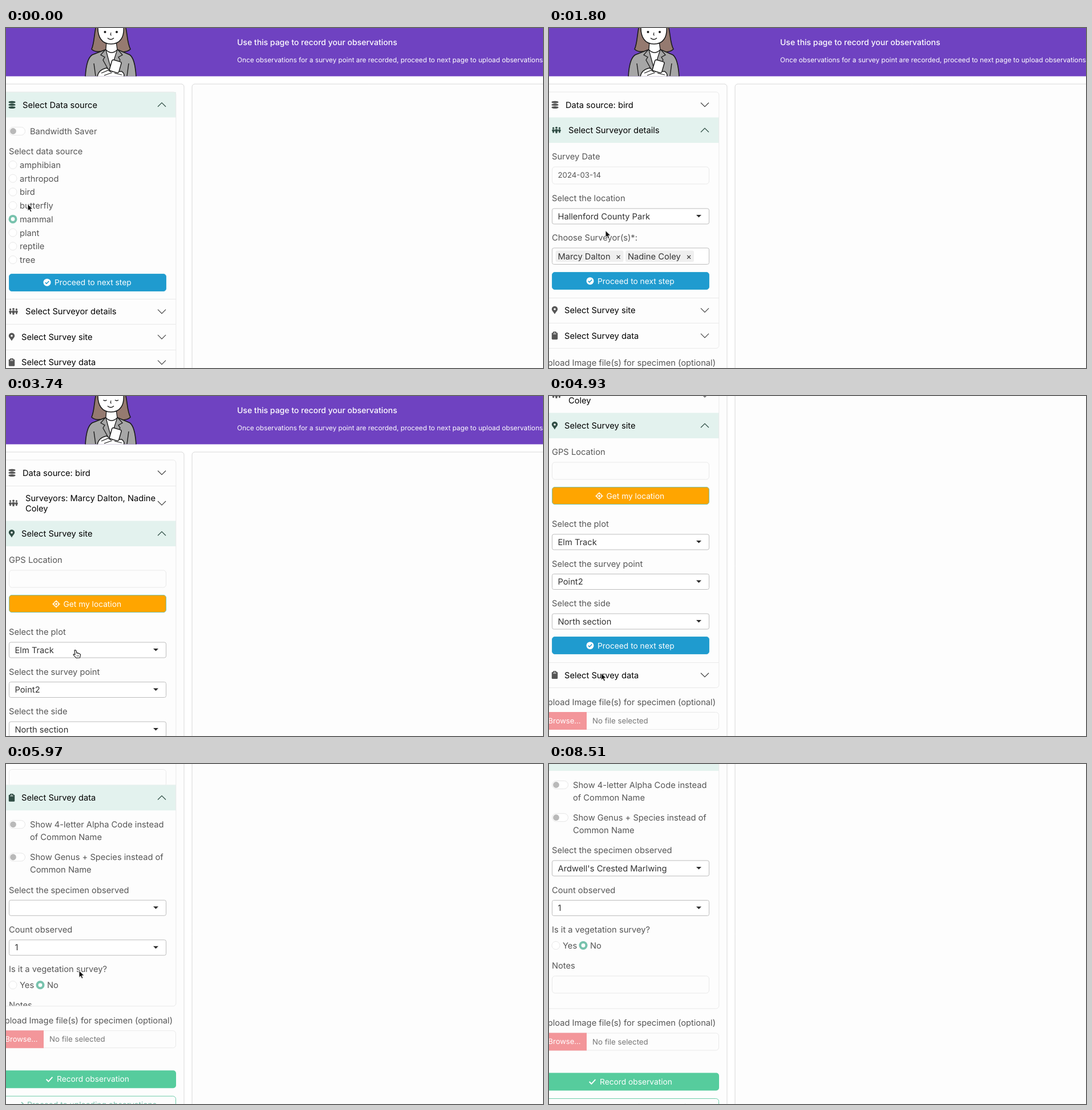
Recreate the animation shown at these times as an HTML page with a canvas. Size 941 px wide and 595 px high, loop 8.53 s.

```html
<!DOCTYPE html>
<html lang="en">
<head>
<meta charset="utf-8">
<title>Record observations</title>
<style>
html, body { margin: 0; width: 100%; height: 100%; overflow: hidden; background: #fff; }
canvas { display: block; width: 941px; height: 595px; }
</style>
</head>
<body>
<canvas id="stage"></canvas>
<script>
const W = 941, H = 595, LOOP = 8530;
const canvas = document.getElementById('stage');
const c = canvas.getContext('2d');
const dpr = window.devicePixelRatio || 1;
canvas.width = W * dpr;
canvas.height = H * dpr;
c.textRendering = 'geometricPrecision';

const SANS = 'Inter, "Open Sans", sans-serif';
const BODY = 14.7, SMALL = 13.25, BTN = 13.75;
const INK = '#565656', DARK = '#000', GREEN = '#78c2ad', DEEP = '#304e45';
const FAINT = '#e9e9e9', PAPER = '#fdfdfd', OPEN = '#e3f2ee';
const SURVEYORS = ['Marcy Dalton', 'Nadine Coley'];
const BIRD = "Ardwell's Crested Marlwing";
const KINDS = ['amphibian', 'arthropod', 'bird', 'butterfly', 'mammal', 'plant', 'reptile', 'tree'];
const LIST = ['American Robin', 'American Wigeon', BIRD, 'Band-tailed Pigeon', 'Barn Owl', 'Barn Swallow'];

// ---------- timing ----------
const tickAt = t => t < 3600 ? Math.floor(t / 150) : 24 + Math.floor((t - 3579) / 149.2);
const unit = v => Math.max(0, Math.min(1, v));
const smooth = v => v * v * (3 - 2 * v);
const slide = (k, start) => 1 - Math.pow(1 - unit((k - start) / 2.3), 2.5);
const fade = (k, start) => k < start ? 0 : k === start ? .5 : 1;

function along(keys, k) {
  let i = 0;
  while (i < keys.length - 2 && k >= keys[i + 1][0]) i++;
  const a = keys[i], b = keys[i + 1];
  const f = smooth(unit((k - a[0]) / (b[0] - a[0])));
  return a.slice(1).map((v, j) => v + (b[j + 1] - v) * f);
}

const SCROLL = [[28, 0], [33, 189], [34, 189], [37, 295.5]];
const POINTER = [
  [0, 38, 308], [3, 13, 285], [4, 13, 285], [7, 68, 419], [8, 80, 443], [10, 80, 443],
  [14, 118, 266], [15, 118, 268], [19, 116.5, 450], [21, 116.5, 450], [25, 121, 445],
  [28, 440, 360], [30, 440, 360], [33, 91.5, 485], [37, 128, 361.5], [40, 128, 361.5],
  [43, 150, 180], [44, 150, 180], [49, 152, 276], [51, 152, 276]
];

// ---------- drawing helpers ----------
function text(s, x, y, size = BODY, color = INK, weight = 400, align = 'left') {
  c.font = weight + ' ' + size + 'px ' + SANS;
  c.textAlign = align;
  c.fillStyle = color;
  c.fillText(s, x, y + size * .364);
}

function box(x, y, w, h, r, fill, line, lw = 1) {
  c.beginPath();
  c.roundRect(x, y, w, h, r);
  if (fill) { c.fillStyle = fill; c.fill(); }
  if (line) { c.strokeStyle = line; c.lineWidth = lw; c.stroke(); }
}

function dot(x, y, r, fill, line, lw = 1) {
  c.beginPath();
  c.arc(x, y, r, 0, 7);
  if (fill) { c.fillStyle = fill; c.fill(); }
  if (line) { c.strokeStyle = line; c.lineWidth = lw; c.stroke(); }
}

function poly(pts, line, lw, fill) {
  c.beginPath();
  for (let i = 0; i < pts.length; i += 2) c.lineTo(pts[i], pts[i + 1]);
  if (fill) { c.closePath(); c.fillStyle = fill; c.fill(); }
  if (line) { c.strokeStyle = line; c.lineWidth = lw; c.stroke(); }
}

function shape(d, fill, line, lw = 1.6) {
  const p = new Path2D(d);
  if (fill) { c.fillStyle = fill; c.fill(p); }
  if (line) { c.strokeStyle = line; c.lineWidth = lw; c.stroke(p); }
}

function blend(a, b, f) {
  return 'rgb(' + a.map((v, i) => Math.round(v + (b[i] - v) * f)).join(',') + ')';
}

// ---------- form parts ----------
function tick(x, y, s, color, lw) {
  poly([x - s, y, x - s * .3, y + s * .7, x + s, y - s * .7], color, lw);
}

function button(y, fill, edge) {
  box(5.5, Math.floor(y) + .5, 275, 30, 4.5, fill, edge);
}

function proceed(y, hover) {
  const fill = blend([31, 155, 207], [92, 166, 181], hover);
  button(y, fill, blend([52, 166, 207], [86, 156, 170], hover));
  dot(72, y + 15.2, 6.5, '#fff');
  tick(72, y + 15.2, 3.2, fill, 1.6);
  text('Proceed to next step', 85, y + 15, BTN, '#fff');
}

function radio(x, y, on, ring) {
  if (ring) dot(x, y, 9.2, null, 'rgba(120,194,173,.4)', 3.4);
  if (on) { dot(x, y, 7.5, GREEN); dot(x, y, 3.4, '#fff'); }
  else dot(x, y, 7, '#fff', '#e8e8e8');
}

function toggle(y) {
  box(5.5, y - 7, 28, 14, 7, '#fff', '#e6e6e6');
  dot(12.5, y, 5.4, '#b9b9b9');
}

function select(y, value, glow) {
  if (glow) box(3.5, y - 1, 279, 30, 5, null, 'rgba(120,194,173,.3)', 3);
  box(5.5, y + .5, 275, 27, 3, '#fff', glow ? '#a6d3c6' : '#bdbdbd');
  text(value, 15.5, y + 13.8, BODY, '#333');
  poly([258, y + 11.5, 267, y + 11.5, 262.5, y + 16], null, 0, '#2b2b2b');
}

function input(y, value = '') {
  box(5.5, y + .5, 275, 30, 5, PAPER, FAINT);
  text(value, 15.5, y + 15, SMALL);
}

// ---------- header icons ----------
const icons = {
  disks(y, col) {
    c.fillStyle = col;
    for (let i = 0; i < 3; i++) {
      const t = y - 6.5 + i * 4.6;
      c.beginPath();
      c.ellipse(10.5, t + 1.9, 6, 1.9, 0, Math.PI, 0);
      c.lineTo(16.5, t + 2.3);
      c.ellipse(10.5, t + 2.3, 6, 1.7, 0, 0, Math.PI);
      c.fill();
    }
  },
  people(y, col) {
    for (const [x, s] of [[7.6, .85], [18.4, .85], [13, 1]]) {
      dot(x, y - 4.2 * s, 1.9 * s, col);
      box(x - 2.8 * s, y - 1.7 * s, 5.6 * s, 4.4 * s, 1.6, col);
      box(x - 1.6 * s, y, 3.2 * s, 5.6 * s, .8, col);
    }
  },
  pin(y, col) {
    shape(`M10 ${y + 7}C8 ${y + 3} 4.8 ${y + 1} 4.8 ${y - 1.9}A5.2 5.2 0 0 1 15.2 ${y - 1.9}C15.2 ${y + 1} 12 ${y + 3} 10 ${y + 7}Z`, col);
    dot(10, y - 1.8, 1.8, PAPER);
  },
  board(y, col) {
    box(4.8, y - 5.2, 10.4, 12, 1.4, col);
    box(7, y - 7, 6, 4, 1.4, col);
    box(7.4, y - 3.6, 5.2, 1, 0, PAPER);
    dot(10, y - 5, .8, PAPER);
  }
};

// ---------- panel bodies, y = top of the body ----------
function sourceBody(y, k) {
  toggle(y + 24);
  text('Bandwidth Saver', 42, y + 24);
  text('Select data source', 5, y + 59);
  const picked = k < 4 ? 'mammal' : 'bird';
  KINDS.forEach((name, i) => {
    const ry = y + 83 + i * 23.73;
    radio(12, ry, name === picked, name === picked && k >= 4);
    text(name, 24, ry);
  });
  proceed(y + 273.5, fade(k, 8));
}

function peopleBody(y, k) {
  text('Survey Date', 5, y + 24);
  input(y + 41.5, '2024-03-14');
  text('Select the location', 5, y + 96.5);
  select(y + 114.5, 'Hallenford County Park');
  text('Choose Surveyor(s)*:', 5, y + 166);
  box(5.5, y + 184, 275, 28.5, 3, '#fff', '#bdbdbd');
  [[11.5, 119], [134, 120]].forEach(([x, w], i) => {
    box(x, y + 188.5, w, 20, 3, '#efefef');
    text(SURVEYORS[i], x + 4, y + 198.3, BODY, '#333');
    text('×', x + w - 9, y + 199, BODY, '#333', 400, 'center');
  });
  proceed(y + 226.5, fade(k, 18));
}

function siteBody(y) {
  text('GPS Location', 5, y + 24);
  input(y + 41.5);
  button(y + 85.5, '#ffa500', GREEN);
  const m = y + 101;
  dot(88, m, 4.2, null, '#fff', 1.6);
  dot(88, m, 1.8, '#fff');
  for (const [dx, dy] of [[1, 0], [-1, 0], [0, 1], [0, -1]])
    poly([88 + dx * 4, m + dy * 4, 88 + dx * 6.6, m + dy * 6.6], '#fff', 1.6);
  text('Get my location', 100.5, m - .3, BTN, '#fff');
  [['Select the plot', 'Elm Track'], ['Select the survey point', 'Point2'], ['Select the side', 'North section']]
    .forEach(([label, value], i) => {
      text(label, 5, y + 150 + i * 69.4);
      select(y + 167.5 + i * 69.5, value);
    });
  proceed(y + 347.5, 0);
}

function dataBody(y, k) {
  [['Show 4-letter Alpha Code instead', 'of Common Name'], ['Show Genus + Species instead of', 'Common Name']]
    .forEach((rows, i) => {
      toggle(y + 24.5 + i * 57.2);
      rows.forEach((s, j) => text(s, 42, y + 24.5 + i * 57.2 + j * 22.1));
    });
  text('Select the specimen observed', 5, y + 139);
  select(y + 156.5, k >= 50 ? BIRD : '', k >= 44 && k < 57);
  text('Count observed', 5, y + 208.3);
  select(y + 226, '1');
  text('Is it a vegetation survey?', 5, y + 277.7);
  radio(12, y + 305.5, false);
  text('Yes', 24, y + 305.5);
  radio(60, y + 305.5, true);
  text('No', 72, y + 305.5);
  text('Notes', 5, y + 340.5);
  input(y + 358.5);
  if (k >= 44 && k < 50) options(y + 184, along(POINTER, k)[1]);
}

function options(y, py) {
  box(5.5, y, 275, 173, [0, 0, 3, 3], '#fff', '#c8c8c8');
  LIST.forEach((name, i) => {
    const top = y + 3 + i * 28, sy = top - 295.5;
    const over = py >= sy && py < sy + 28 || i === 0 && py < sy;
    if (over) box(6, top, 274, 28, 0, GREEN);
    text(name, 15.5, top + 14, BODY, over ? '#fff' : '#333');
  });
}

// ---------- page ----------
function head(y, h, open, icon, x, rows) {
  if (open) box(-6, y, 304, h, 0, OPEN);
  const col = open ? DEEP : INK, mid = y + h / 2, s = open ? -3.5 : 3.5;
  icons[icon](mid, col);
  rows.forEach((row, i) => text(row, x, mid + (i - (rows.length - 1) / 2) * 17.6, BODY, DARK));
  poly([266, mid - s, 273, mid + s, 280, mid - s], open ? DEEP : '#444', 1.2);
}

function accordion(k) {
  const a = slide(k, 9.5), b = slide(k, 20.6), d = slide(k, 38.85);
  const named = b > 0;
  const panels = [
    ['disks', 29, [a ? 'Data source: bird' : 'Select Data source'], 44.5, 317.3, 1 - a, a === 0, sourceBody],
    ['people', 34, named ? ['Surveyors: ' + SURVEYORS[0] + ', ' + SURVEYORS[1].split(' ')[0], SURVEYORS[1].split(' ')[1]]
      : ['Select Surveyor details'], named ? 62 : 44.5, 270.6, a - b, a > 0 && !named, peopleBody],
    ['pin', 27, ['Select Survey site'], 44.5, 392, b - d, named && d === 0, siteBody],
    ['board', 27, ['Select Survey data'], 44.5, 416, d, d > 0, dataBody]
  ];
  let y = 112;
  panels.forEach(([icon, x, rows, h, full, shown, open, body], i) => {
    if (i) poly([-6, Math.round(y) + .5, 298, Math.round(y) + .5], FAINT, 1);
    head(y, h, open, icon, x, rows);
    y += h;
    if (shown > 0) {
      c.save();
      c.beginPath();
      c.rect(-6, y, 304, full * shown);
      c.clip();
      body(y, k);
      c.restore();
      y += full * shown;
    }
  });
  box(-8, 112, 305.8, y - 112, 5, null, FAINT);
  return y;
}

function footer(y) {
  text('Upload Image file(s) for specimen (optional)', 292, y + 24.8, BODY, INK, 400, 'right');
  box(-8, y + 43, 305.5, 30, 5, PAPER, FAINT);
  box(-8, y + 42.5, 74, 31, 0, '#f3969a');
  text('Browse...', 55.5, y + 57.5, 13, '#fff', 400, 'right');
  text('No file selected', 76, y + 57.8, SMALL, '#757575');
  box(-8, y + 112.5, 306, 31, 5, '#56cc9d');
  tick(76, y + 128, 5.4, '#fff', 1.9);
  text('Record observation', 89, y + 127.7, BTN, '#fff');
  box(-8, y + 157.5, 305.5, 30, 5, null, '#6fcdab');
  const m = y + 172.5;
  poly([20, m, 31, m], GREEN, 1.6);
  poly([27, m - 4.5, 31.5, m, 27, m + 4.5], GREEN, 1.6);
  text('Proceed to uploading observations', 37, m - .5, BTN, GREEN);
}

function surveyor(blink) {
  const line = '#1b1b1b';
  shape('M158 -4C154 12 155 26 150 37C156 43 166 42 172 39L196 40C204 43 213 42 218 37C212 26 213 10 209 -4Z', '#957a70', line);
  shape('M139 86C140 66 143 52 151 47L174 38L196 38L217 47C224 52 227 68 228 86Z', '#a6a6a6', line);
  shape('M175 38L184 72L195 38Z', '#fff', line, 1.3);
  shape('M176 24L175 38Q185 48 195 38L193 24Z', '#fff', line, 1.3);
  shape('M161 -4C160 16 168 28 184 28C200 28 208 16 206 -4Z', '#fff', line);
  shape('M174 38L166 47L173 51L170 56L181 76M196 38L204 47L197 51L200 56L192 70', null, line, 1.3);
  shape('M154 62L157 84M215 62L212 84', null, line, 1.4);
  for (const x of [173.5, 194]) {
    if (blink) shape(`M${x - 3} 7Q${x} 9.5 ${x + 3} 7`, null, line, 1.4);
    else dot(x, 7, 2, line);
  }
  shape('M184 8L183 12L185 12.5', null, line, 1.1);
  shape('M178 17.5Q183.5 22.5 189 17.5', null, line, 1.4);
  shape('M160 86C161 77 167 72 176 70L186 76L203 76Q209 81 206 86Z', '#fff', line, 1.4);
  c.save();
  c.translate(191.5, 66);
  c.rotate(.28);
  box(-8, -9, 17, 20, 2.5, '#fff', line, 1.5);
  c.restore();
  shape('M167 79L179 74L184 77M172 83L186 78M190 79L203 82', null, line, 1.2);
}

function banner(k) {
  box(0, 0, W, 84.6, 0, '#6f42c1');
  c.save();
  c.beginPath();
  c.rect(0, 0, W, 84.6);
  c.clip();
  surveyor(k === 4 || k === 25);
  c.restore();
  text('Use this page to record your observations', 405, 25, 14, '#fff', 500);
  text('Once observations for a survey point are recorded, proceed to next page to upload observations', 405, 55.3, 11.76, '#fff');
}

function pointer(k) {
  if (k >= 52) return;
  const [x, y] = along(POINTER, k);
  const hand = k >= 8 && k <= 10 || k >= 18 && k <= 26;
  c.save();
  c.translate(x, y);
  c.lineJoin = 'round';
  if (hand) {
    shape('M-1 0Q1 -1 2 1L3 5Q5 4 5.5 5.5Q7.5 4.8 8 6.5Q10 6.5 9.5 8.5L8.5 13L2 13.5L-3 8Q-3 6 0 7.5Z', '#fff', '#111', 1.1);
    shape('M3.5 8.5L4 11M6 8.3L6.2 10.8', null, '#111', .8);
  } else {
    shape('M0 0V12.2L2.8 9.6L4.8 14L7 13L5.1 8.8H9Z', '#111', '#fff', .9);
  }
  c.restore();
}

function draw(t) {
  const k = tickAt(t);
  c.setTransform(dpr, 0, 0, dpr, 0, 0);
  box(0, 0, W, H, 0, '#fff');
  c.save();
  c.translate(0, -along(SCROLL, k)[0]);
  banner(k);
  box(-8, 98, 320, 1400, 5, PAPER, '#d9d9d9');
  box(326, 98, 640, 1400, 5, PAPER, '#d9d9d9');
  footer(accordion(k));
  c.restore();
  pointer(k);
}

function frame() {
  draw(performance.now() % LOOP);
  requestAnimationFrame(frame);
}
frame();
</script>
</body>
</html>
```
